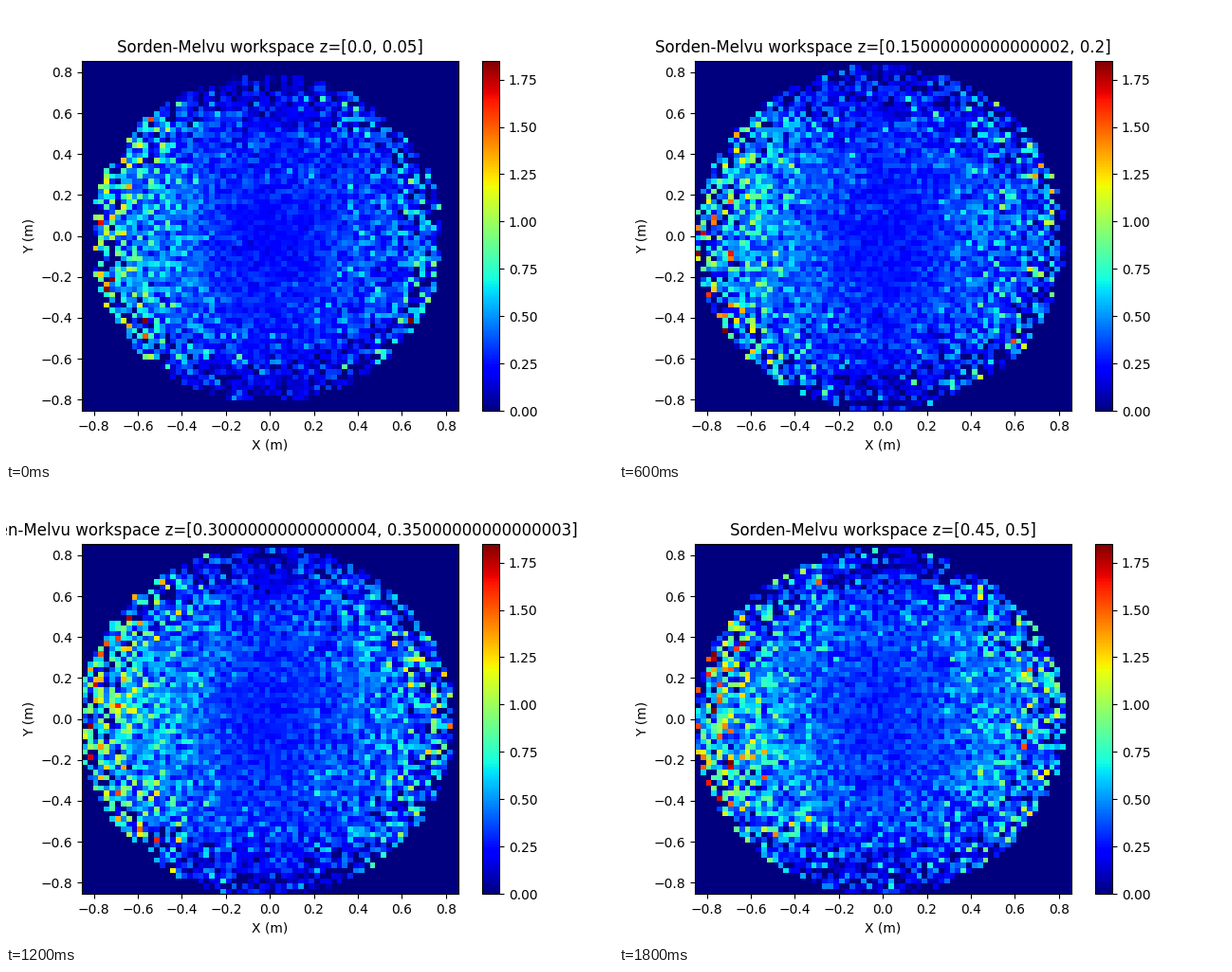
A matplotlib script that plays this animation: 640 px wide and 480 px high, repeating every 2000 ms.

```python
import numpy as np
import matplotlib.pyplot as plt
from matplotlib.animation import FuncAnimation

REACH = 0.855       # arm reach in metres
FAR_EDGE = 0.8568   # upper limit of both axes
SHOULDER = 0.333    # height of the reach sphere's centre
BINS = 68
STEP = 0.05
SLICES = 10
VMAX = 1.85

edges = np.linspace(-REACH, FAR_EDGE, BINS + 1)
mids = (edges[:-1] + edges[1:]) / 2
# bins round down, which moves the disc half a cell to the lower left
X, Y = np.meshgrid(mids + 0.0125, mids + 0.0125)


def slice_range(i):
    low = i * STEP
    return low, low + STEP


def slice_values(i):
    """Noisy measure over one height slice of the workspace."""
    rng = np.random.default_rng(40 + i)
    low, high = slice_range(i)
    nearest = np.clip(SHOULDER, low, high)
    middle = (low + high) / 2
    radius = np.sqrt(REACH**2 - ((nearest + middle) / 2 - SHOULDER)**2)
    u, v = X / radius, Y / radius
    r = np.hypot(u, v)
    inside = np.clip(1 - r, 0, 1)

    side = np.where(u < 0, 0.52, 0.21 + 0.01 * i)
    mean = 0.24 + 0.007 * i + side * np.abs(u)**1.7
    mean += 0.05 * np.exp(-((r - 0.5) / 0.2)**2)
    mean -= 0.08 * np.clip((np.abs(v) - 0.6) / 0.4, 0, 1)

    shape = 2.6 + 42 * inside**2
    values = rng.gamma(shape, mean / shape)
    empty = 0.36 * np.clip((r - 0.7) / 0.3, 0, 1)**1.6
    values[rng.random(r.shape) < empty] = 0
    values[r > 1] = 0
    return np.minimum(values, VMAX)


fig, ax = plt.subplots(figsize=(6.4, 4.8), dpi=100)
image = ax.imshow(np.zeros((BINS, BINS)), cmap="jet", vmin=0, vmax=VMAX,
                  origin="lower", aspect="auto", interpolation="nearest",
                  extent=(-REACH, FAR_EDGE, -REACH, FAR_EDGE))
fig.colorbar(image, ax=ax)
ax.set_xlabel("X (m)")
ax.set_ylabel("Y (m)")
title = ax.set_title("")


def update(i):
    low, high = slice_range(i)
    image.set_data(slice_values(i))
    title.set_text(f"Sorden-Melvu workspace z=[{low}, {high}]")
    return image, title


anim = FuncAnimation(fig, update, frames=SLICES, interval=200,
                     repeat=True, repeat_delay=0)
plt.show()
```
